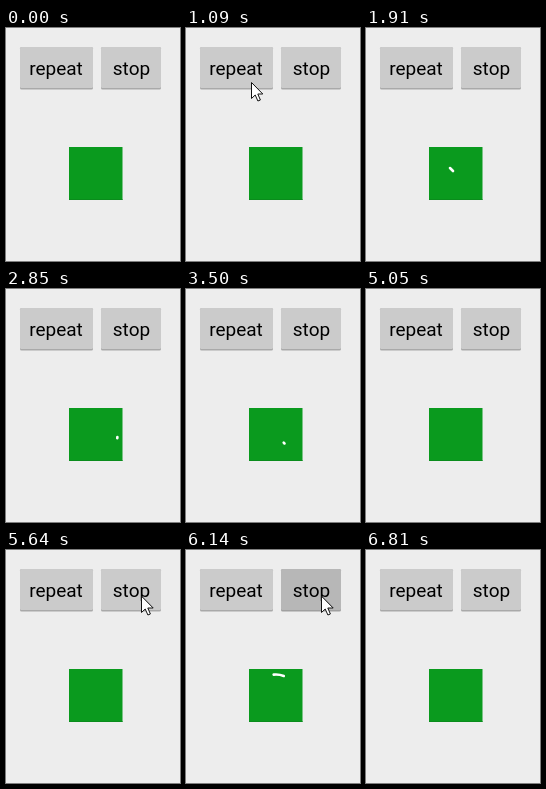
Animation of 174x233 px, one loop 8770 ms. Source, as an HTML page with a canvas:

```html
<!DOCTYPE html>
<html lang="en">
<head>
<meta charset="utf-8">
<title>Repeat and stop</title>
<style>
html, body { margin: 0; width: 100%; height: 100%; overflow: hidden; background: #ededed; }
canvas { display: block; }
</style>
</head>
<body>
<canvas id="stage" width="174" height="233"></canvas>
<script>
const ctx = document.getElementById('stage').getContext('2d');
const LOOP = 8770;
const FIRST = 1309, PERIOD = 1492, RUNS = 4;
const CX = 90, CY = 146, RADIUS = 21.5, ARM = 10.5;

const ease = u => 0.5 - 0.5 * Math.cos(Math.PI * u);
const mix = (a, b, u) => a + (b - a) * u;

// Pointer legs: start, end, from, to; the pointer rests until "until"
const legs = [
  { start: 620, end: 1060, until: 1400, from: [152, 90], to: [65, 54] },
  { start: 1400, end: 1800, until: 1800, from: [65, 54], to: [176, 96] },
  { start: 5130, end: 5560, until: 6400, from: [176, 92], to: [135, 46] }
];
const PRESS = [6080, 6210];
const arrow = new Path2D('M.5 .5V16.5L4.2 13L6.9 19L9.4 18L6.8 12H11.8Z');

function button(x, w, label, textX, pressed) {
  ctx.fillStyle = pressed ? '#a0a0a0' : '#a9a9a9';
  ctx.beginPath();
  ctx.roundRect(x, 19, w, 42.5, 1.5);
  ctx.fill();
  ctx.fillStyle = pressed ? '#b7b7b7' : '#cbcbcb';
  ctx.beginPath();
  ctx.roundRect(x, 19, w, 41, 1.5);
  ctx.fill();
  ctx.fillStyle = '#000';
  ctx.font = '19px Roboto, sans-serif';
  ctx.fillText(label, textX, 47);
}

function square() {
  ctx.fillStyle = '#0a9a1e';
  ctx.fillRect(63, 119, 53.5, 53);
  ctx.fillStyle = '#0a8c1c';
  ctx.fillRect(63, 171, 53.5, 1);
}

// A short piece of the circle, then of each arm of the cross
function tracer(t) {
  const run = Math.floor((t - FIRST) / PERIOD);
  if (run < 0 || run >= RUNS) return;
  const age = t - FIRST - run * PERIOD;
  if (age >= 1000) return;
  const onCircle = age < 500;
  const end = ease(onCircle ? age / 500 : (age % 250) / 250);
  const size = 0.4 * Math.min(end, 1 - end);
  if (size < 0.004) return;
  const start = end - size;
  ctx.beginPath();
  if (onCircle) {
    ctx.arc(CX, CY, RADIUS, start * 2 * Math.PI, end * 2 * Math.PI);
  } else {
    const dir = age < 750 ? 1 : -1;
    for (const v of [start, end]) {
      const d = mix(-ARM, ARM, v);
      ctx.lineTo(CX + d, CY + dir * d);
    }
  }
  ctx.strokeStyle = '#fff';
  ctx.lineWidth = 2.6;
  ctx.lineCap = 'round';
  ctx.stroke();
}

function pointer(t) {
  const leg = legs.find(l => t >= l.start && t < l.until);
  if (!leg) return;
  const u = ease(Math.min(1, (t - leg.start) / (leg.end - leg.start)));
  ctx.save();
  ctx.translate(mix(leg.from[0], leg.to[0], u), mix(leg.from[1], leg.to[1], u));
  ctx.fillStyle = '#fff';
  ctx.strokeStyle = '#111';
  ctx.lineWidth = 1;
  ctx.fill(arrow);
  ctx.stroke(arrow);
  ctx.restore();
}

function draw(now) {
  const t = now % LOOP;
  ctx.fillStyle = '#ededed';
  ctx.fillRect(0, 0, 174, 233);
  button(14, 73, 'repeat', 23.2, false);
  button(95, 60, 'stop', 106.8, t >= PRESS[0] && t < PRESS[1]);
  square();
  tracer(t);
  pointer(t);
}

function tick() {
  draw(performance.now());
  requestAnimationFrame(tick);
}
tick();
</script>
</body>
</html>
```
